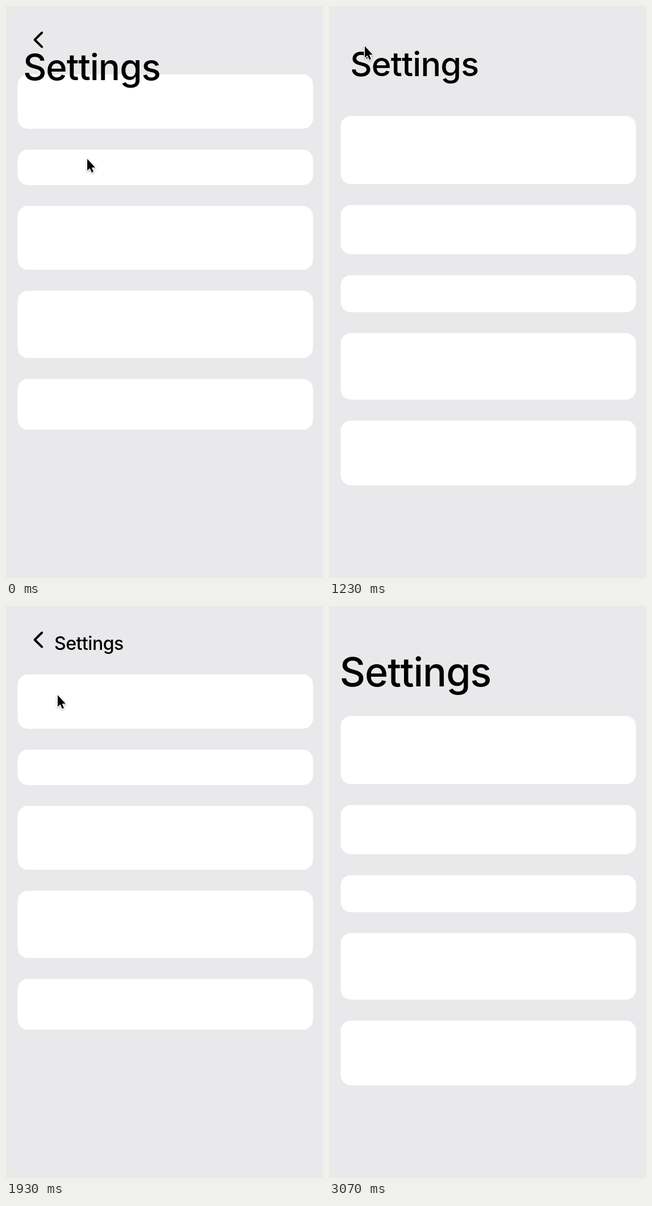
Recreate the animation shown at these times as an HTML page. Size 558 by 1003 pixels, loop 3.43 s.

```html
<!DOCTYPE html>
<html lang="en">
<head>
<meta charset="utf-8">
<title>Settings</title>
<style>
  html, body { margin: 0; width: 100%; height: 100%; overflow: hidden; background: #e9e9eb; }
  svg { display: block; width: 100%; height: 100%; }
  text { font: 500 70px Inter, "Open Sans", sans-serif; letter-spacing: -1.05px; }
  #cursor { filter: drop-shadow(0 1.5px 1.5px rgba(0, 0, 0, .35)); }
</style>
</head>
<body>
<svg viewBox="0 0 558 1003">
  <rect width="558" height="1003" fill="#e9e9eb"/>
  <g id="list" fill="#fff"></g>
  <g id="detail" fill="#fff">
    <path d="M63.2 46.8 L50.6 59.2 L63.2 71.6" fill="none" stroke="#000" stroke-width="4" stroke-linecap="round" stroke-linejoin="round"/>
  </g>
  <text id="title">Settings</text>
  <path id="cursor" d="M0 0V20.5L4.6 16.4L8 24L11 22.7L7.8 15.2H14Z" stroke="#fff" stroke-width="3" stroke-linejoin="round" paint-order="stroke"/>
</svg>
<script>
const LOOP = 3430;
const GAP = 36.7;
const el = id => document.getElementById(id);
const lerp = (a, b, p) => a + (b - a) * p;
const clamp = s => Math.min(1, Math.max(0, s));
const smooth = s => s * s * (3 - 2 * s);
const show = (id, on) => { el(id).style.display = on ? "" : "none"; };

// stacks cards of the given heights with an even gap
function stack(id, y, heights) {
  for (const height of heights) {
    const card = document.createElementNS("http://www.w3.org/2000/svg", "rect");
    const attrs = { x: 20.5, y, width: 520, height, rx: 18 };
    for (const k in attrs) card.setAttribute(k, attrs[k]);
    el(id).append(card);
    y += height + GAP;
  }
}
stack("list", 192.8, [119.5, 86.2, 65, 116.6, 113.5]);
stack("detail", 120, [95.2, 62, 112, 118, 89]);

// each tap toggles between list and detail, starting with detail
const taps = [-52, 1043, 1682, 2443];

// spring with a 500 ms period and 0.85 damping
function spring(ms) {
  const z = 0.85, w = Math.PI * 2 / 500, q = Math.sqrt(1 - z * z), a = q * w * ms;
  return 1 - Math.exp(-z * w * ms) * (Math.cos(a) + z / q * Math.sin(a));
}

const back = { x: 60, y: 61 };
const moves = [
  { from: 20, to: 420, x: 32, y: 24 },
  { from: 630, to: 900, ...back },
  { from: 1170, to: 1600, x: 115, y: 230 },
  { from: 1670, to: 2240, ...back },
  { from: 2640, to: 2830, x: 50, y: 17 }
];

function cursorAt(t) {
  let x = 143, y = 268;
  for (const m of moves) {
    const p = smooth(clamp((t - m.from) / (m.to - m.from)));
    x = lerp(x, m.x, p);
    y = lerp(y, m.y, p);
  }
  return [x, y];
}

function render(t) {
  const tap = taps.findLastIndex(k => k <= t);
  const open = tap % 2 === 0;
  const s = spring(t - taps[tap]), p = open ? s : 1 - s;
  show("list", !open);
  show("detail", open);
  show("cursor", t < 3070);
  el("title").setAttribute("transform",
    `translate(${lerp(19, 92.9, p)} ${lerp(141.3, 69.2, p)}) scale(${lerp(1, 0.393, p)})`);
  el("cursor").setAttribute("transform", `translate(${cursorAt(t)})`);
}

const start = performance.now();
function tick() {
  render((performance.now() - start) % LOOP);
  requestAnimationFrame(tick);
}
tick();
</script>
</body>
</html>
```
